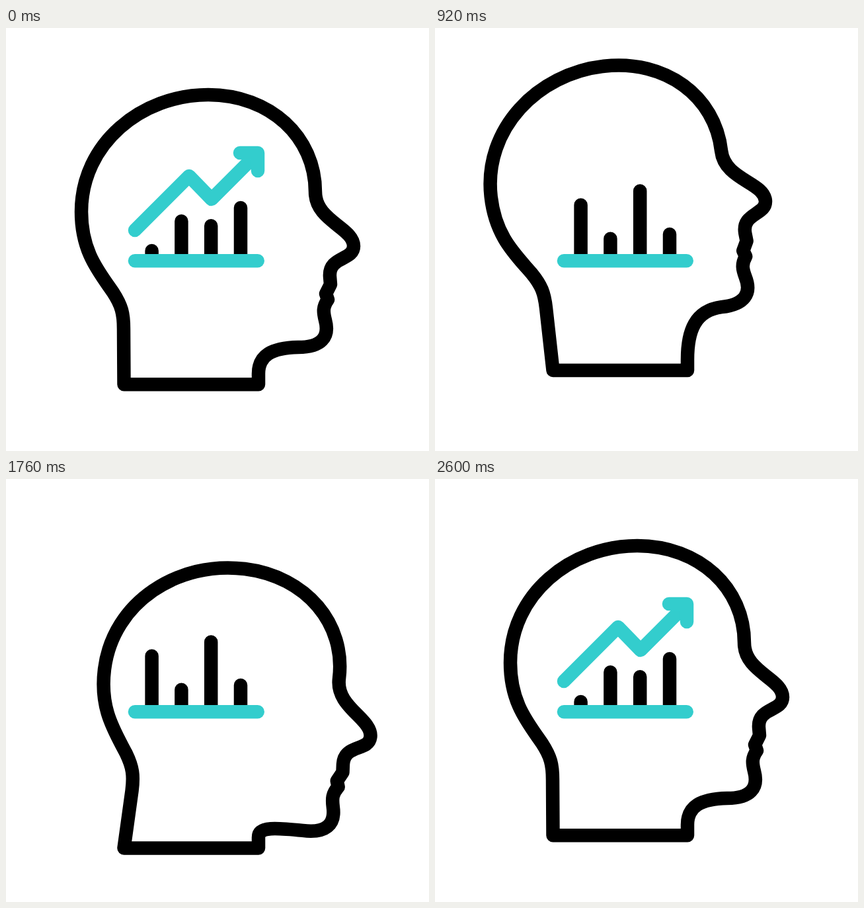
These frames come from a looping animation (640 px wide and 640 px high, 3000 ms). An HTML page:

```html
<!DOCTYPE html>
<html lang="en">
<head>
<meta charset="utf-8">
<title>Growth mindset</title>
<style>
  html, body { margin: 0; height: 100%; overflow: hidden; background: #fff; }
  svg { display: block; width: 100vw; height: 100vh; }
  path { fill: none; stroke: #000; stroke-width: 20.5; stroke-linecap: round; stroke-linejoin: round; }
  .teal { stroke: #33cdcd; }
</style>
</head>
<body>
<svg viewBox="0 0 640 640">
  <path id="head"/>
  <path id="bars"/>
  <path class="teal" d="M195 352.3H380.7"/>
  <path class="teal" id="shaft" pathLength="1" d="M195 306L277 224L311 259L377 193"/>
  <path class="teal" id="tip" d="M354 189H381V216"/>
</svg>
<script>
const LOOP = 3000, STEP = 40;

// The skull and face turn as one piece; the neck joins them to the base.
const SKULL = `178,455 C178,432 175,420 162,400 C140,368 114,338 114,278
  C114,175 205,101 306,101 C400,101 468,165 468,248 C468,292 526,302 526,330
  C526,352 488,345 490,376 L491,388 L484,402 L487,411 C479,422 480,430 483,442
  C490,468 477,483 442,483 C402,484`;
const PIVOT = { x: 280, y: 550 };

// Poses: turn in degrees, head shift, base shift.
const REST = [0, 0, 0], UP = [-6.8, -45.2, -22.5], DOWN = [7.3, 29, 19.7];
// Moves: start, end, from, to, and the two easing handles.
const MOVES = [
  [198, 818, REST, UP, 0.25, 0.6],
  [834, 1680, UP, DOWN, 0.36, 0.52],
  [1680, 2484, DOWN, REST, 0.41, 0.23],
];
// Bars: x, top at rest, travel.
const BARS = [[220.6, 327, -84], [265.4, 282.3, 32], [310.2, 289.3, -64], [355, 262, 48.5]];

const el = id => document.getElementById(id);
const clamp = (v, max = 1) => Math.min(max, Math.max(0, v));
const progress = (t, start, end) => clamp((t - start) / (end - start));
const smooth = u => u * u * (3 - 2 * u);

// cubic-bezier(a, 0, b, 1)
function ease(u, a, b) {
  let lo = 0, hi = 1;
  for (let i = 0; i < 24; i++) {
    const s = (lo + hi) / 2, r = 1 - s;
    if (3 * r * r * s * a + 3 * r * s * s * b + s * s * s < u) lo = s; else hi = s;
  }
  return smooth(lo);
}

function poseAt(t) {
  const [start, end, from, to, a, b] = MOVES.findLast(m => t >= m[0]) || MOVES[0];
  const k = ease(progress(t, start, end), a, b);
  return from.map((v, i) => v + (to[i] - v) * k);
}

function drawHead(t) {
  const [turn, lift, base] = poseAt(t);
  const c = Math.cos(turn * Math.PI / 180), s = Math.sin(turn * Math.PI / 180);
  const place = (x, y) => {
    const dx = x - PIVOT.x, dy = y - PIVOT.y;
    return [PIVOT.x + dx * c - dy * s, PIVOT.y + lift + dx * s + dy * c];
  };
  const skull = SKULL.replace(/(\d+),(\d+)/g, (_, x, y) => place(+x, +y).map(v => v.toFixed(2)).join());
  const throat = (place(382, 495)[1] + 495 + base) / 2;
  el("head").setAttribute("d",
    `M178.5,${539.3 + base} L${skull} 382,${throat} 382,${523 + base} V${539.3 + base} Z`);
}

function drawBars(t) {
  const u = clamp((t - 196) / 572, 4);
  const k = smooth(1 - Math.abs(1 - u % 2));
  el("bars").setAttribute("d", BARS.map(([x, top, travel]) => `M${x} 350V${top + 10 + travel * k}`).join(""));
}

function drawArrow(t) {
  const redraw = t > 2440;
  const start = redraw ? 0 : smooth(progress(t, 196, 604));
  const end = redraw ? smooth(progress(t, 2440, 2600)) : 1;
  const shaft = el("shaft").style;
  shaft.display = end > start ? "" : "none";
  shaft.strokeDasharray = `${end - start} 2`;
  shaft.strokeDashoffset = -start;
  el("tip").style.display = start < 1 && end > 0.9 ? "" : "none";
}

function draw() {
  const t = Math.floor(performance.now() % LOOP / STEP) * STEP;
  drawHead(t);
  drawBars(t);
  drawArrow(t);
  requestAnimationFrame(draw);
}
draw();
</script>
</body>
</html>
```
